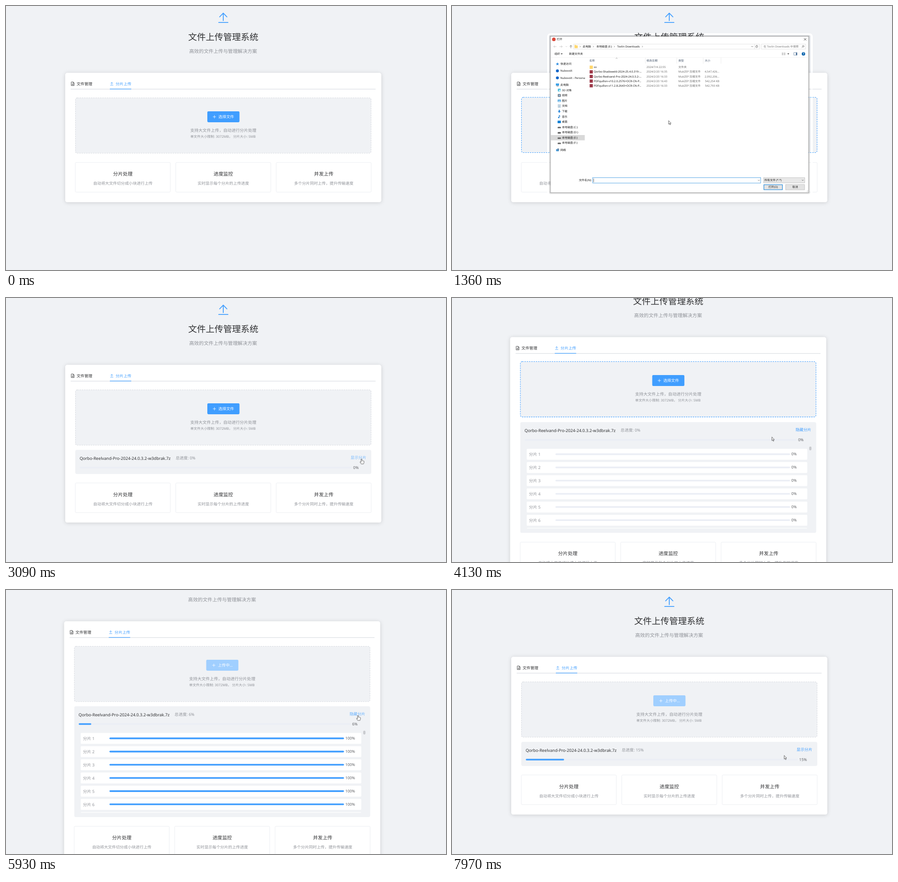
These frames come from a looping animation (966 by 579 pixels, 8 s). An HTML page:

```html
<!DOCTYPE html>
<html lang="zh-CN">
<head>
<meta charset="utf-8">
<title>文件上传管理系统</title>
<style>
html, body { margin: 0; width: 100%; height: 100%; overflow: hidden; background: #f0f2f5; }
svg { display: block; width: 966px; height: 579px; }
text {
  font-family: "Noto Sans", "Noto Sans CJK SC", "Noto Sans CJK", sans-serif;
  dominant-baseline: central; text-rendering: geometricPrecision; white-space: pre;
}
.mid { text-anchor: middle; }
.end { text-anchor: end; }
.dark { fill: #303133; }
.soft { fill: #909399; }
.blue { fill: #409eff; }
.line { fill: none; stroke-linecap: round; stroke-linejoin: round; }

/* one loop is 8 s, so 1% is 80 ms */
#page { animation: scroll 8s infinite linear; }
#card { filter: drop-shadow(0 1px 4px rgba(0,0,0,.15)); animation: card 8s infinite step-end; }
#features { animation: features 8s infinite step-end; }
#zone { animation: hot 8s infinite linear; }
#button { animation: button 8s infinite step-end; }
#idle { animation: idle 8s infinite step-end; }
#busy { animation: busy 8s infinite step-end; }
#file { animation: file 8s infinite step-end; }
#panel { animation: panel 8s infinite step-end; }
#list, #hide { animation: open 8s infinite step-end; }
#show { animation: shut 8s infinite step-end; }
#links { animation: link 8s infinite linear; }
#total { animation: total 8s infinite linear; }
.chunk { animation: grow 8s linear calc(4567ms + var(--i) * 55ms) infinite backwards; }
#dialog, #halo { animation: dialog 8s infinite linear; }
#halo { mix-blend-mode: color-dodge; }
#row { animation: row 8s infinite step-end; }
#cursor { animation: move 8s infinite ease-in-out; }
#arrow { animation: arrow 8s infinite step-end; }
#hand { animation: hand 8s infinite step-end; }

@keyframes scroll {
  0%, 45.62% { transform: none; }
  45.625% { transform: translate(-2.4px, 0); }
  49.97% { transform: translate(-2.4px, 0); animation-timing-function: cubic-bezier(.33,.67,.67,1); }
  53.125%, 78.12% { transform: translate(-2.4px, -78px); }
  78.125%, 100% { transform: none; }
}
@keyframes card {
  0% { height: 283.6px; } 27.625% { height: 346px; }
  45.625% { height: 536px; } 78.125% { height: 346px; }
}
@keyframes features {
  0% { transform: none; } 27.625% { transform: translateY(62.5px); }
  45.625% { transform: translateY(253px); } 78.125% { transform: translateY(62.5px); }
}
@keyframes hot {
  0%, 4.8%, 30%, 31.2%, 38%, 47%, 54%, 88.2%, 93.5%, 100% { color: #d6d9df; transform: none; }
  7%, 28.2%, 33.5%, 35.5%, 49%, 52.6%, 90%, 91.5% { color: #409eff; transform: translateY(-1.2px); }
}
@keyframes button {
  0% { fill: #409eff; } 8% { fill: #79bbff; } 28.2% { fill: #409eff; } 56.6% { fill: #a0cfff; }
}
@keyframes idle { 0% { visibility: visible; } 56.6% { visibility: hidden; } }
@keyframes busy { 0% { visibility: hidden; } 56.6% { visibility: visible; } }
@keyframes file { 0% { visibility: hidden; } 27.625% { visibility: visible; } }
@keyframes panel { 0% { height: 53px; } 45.625% { height: 243px; } 78.125% { height: 53px; } }
@keyframes open {
  0% { visibility: hidden; } 45.625% { visibility: visible; } 78.125% { visibility: hidden; }
}
@keyframes shut {
  0% { visibility: hidden; } 27.625% { visibility: visible; }
  45.625% { visibility: hidden; } 78.125% { visibility: visible; }
}
@keyframes link {
  0%, 37.4%, 48%, 73.4%, 78.2%, 100% { fill: #409eff; }
  38.2%, 46.4%, 74.6%, 78.1% { fill: #79bbff; }
}
@keyframes total {
  0%, 57.1% { width: 0; } 61.6% { width: 3.2px; } 66.6% { width: 12px; }
  86.1% { width: 52.5px; } 99.6% { width: 84px; } 100% { width: 85px; }
}
@keyframes grow {
  0% { width: 0; animation-timing-function: ease; }
  7.5%, 30% { width: 515px; }
  30.1%, 100% { width: 0; }
}
@keyframes dialog {
  0%, 13.2% { opacity: 0; } 14.8%, 27.6% { opacity: 1; } 28.6%, 100% { opacity: 0; }
}
@keyframes row { 0% { visibility: hidden; } 20.8% { visibility: visible; } 29% { visibility: hidden; } }
@keyframes move {
  0% { transform: translate(491px, 590px); }
  .5% { transform: translate(490px, 551px); }
  8.75%, 17% { transform: translate(475.2px, 251px); }
  21% { transform: translate(343px, 152px); }
  22.5% { transform: translate(356px, 152px); }
  24.5%, 28.6% { transform: translate(350px, 152px); }
  37.6%, 38.7% { transform: translate(780.5px, 352.5px); }
  40.6% { transform: translate(784px, 353px); }
  43.1%, 46.1% { transform: translate(781px, 352.5px); }
  48.75%, 68.1% { transform: translate(702px, 304.5px); }
  74.4%, 88.1% { transform: translate(773px, 274.5px); }
  93% { transform: translate(757px, 332px); }
  97.6% { transform: translate(729px, 353px); }
  99.6%, 100% { transform: translate(729px, 362.5px); }
}
@keyframes arrow {
  0% { visibility: visible; } 8% { visibility: hidden; } 13.5% { visibility: visible; }
  37.5% { visibility: hidden; } 46.3% { visibility: visible; }
  73.7% { visibility: hidden; } 88.2% { visibility: visible; }
}
@keyframes hand {
  0% { visibility: hidden; } 8% { visibility: visible; } 13.5% { visibility: hidden; }
  37.5% { visibility: visible; } 46.3% { visibility: hidden; }
  73.7% { visibility: visible; } 88.2% { visibility: hidden; }
}
</style>
</head>
<body>
<svg viewBox="0 0 966 579" xmlns="http://www.w3.org/2000/svg">
  <defs>
    <clipPath id="listBox"><rect x="160" y="386" width="640" height="180.3"/></clipPath>
    <clipPath id="sideBox"><rect x="217" y="114" width="74.8" height="252"/></clipPath>
    <path id="plus" class="line" stroke="#fff" stroke-width=".8" d="M-3 0H3M0-3V3"/>
  </defs>
  <rect width="966" height="579" fill="#f0f2f5"/>

  <g id="page">
    <path class="line" stroke="#409eff" stroke-width="1.8" d="M467 36.2H487.3M477 32V15.7M469 23.8L477 15.7L485 23.8"/>
    <text class="mid dark" x="477" y="67" font-size="19.3">文件上传管理系统</text>
    <text class="mid soft" x="476.7" y="99.5" font-size="10.65">高效的文件上传与管理解决方案</text>

    <rect id="card" x="130" y="146.6" width="694" height="283.6" rx="4.5" fill="#fff"/>
    <path stroke="#dcdfe4" stroke-width="1.1" d="M142 182.4H811.5"/>
    <path stroke="#409eff" stroke-width="1.3" d="M228 182.2H275"/>
    <path class="line" stroke="#303133" stroke-width=".8" d="M143.6 166.7H147.6L149.6 168.7V174.6H143.6ZM147.4 166.9V169H149.4M145 171H148.2M145 172.8H148.2"/>
    <text class="dark" x="155" y="171" font-size="8.6">文件管理</text>
    <path class="line" stroke="#409eff" stroke-width=".8" d="M229.3 173.7H235.2M232.2 172V167.5M229.8 169.8L232.2 167.4L234.6 169.8"/>
    <text class="blue" x="240.7" y="171" font-size="8.6">分片上传</text>

    <g id="zone">
      <rect x="152.5" y="201.5" width="649" height="121.3" rx="4" fill="#f0f2f5" stroke="currentColor" stroke-width="1.05" stroke-dasharray="3 2"/>
      <rect id="button" x="442" y="231" width="70.6" height="24" rx="2.4"/>
      <g id="idle">
        <use href="#plus" x="457.6" y="243"/>
        <text x="466.3" y="242.7" font-size="8.6" fill="#fff">选择文件</text>
      </g>
      <g id="busy">
        <use href="#plus" x="458.6" y="243"/>
        <text x="467.6" y="242.7" font-size="8.6" fill="#fff">上传中...</text>
      </g>
      <text class="soft mid" x="477" y="272" font-size="9.08">支持大文件上传，自动进行分片处理</text>
      <text class="soft" x="404.7" y="287" font-size="7.45">单文件大小限制: 3072MB， 分片大小: 5MB</text>
    </g>

    <g id="file">
      <rect id="panel" x="152" y="333" width="650" height="53" rx="4" fill="#f0f2f5"/>
      <text class="dark" x="161.7" y="351" font-size="9.15">Qorbo-Reelvand-Pro-2024-24.0.3.2-w3dbrak.7z</text>
      <text id="sum" class="soft" x="372.5" y="350.7" font-size="8.8"></text>
      <rect x="162" y="370.2" width="597" height="3.6" rx="1.8" fill="#ebeef5"/>
      <rect id="total" x="162" y="370.2" height="3.6" rx="1.8" fill="#409eff"/>
      <text id="pct" x="762.3" y="372.5" font-size="8.5" fill="#606266"></text>
    </g>
    <g id="links" class="end" font-size="8.6">
      <text id="show" x="791" y="350">显示分片</text>
      <text id="hide" x="791" y="350">隐藏分片</text>
    </g>
    <g id="list">
      <g id="chunks" clip-path="url(#listBox)"></g>
      <rect x="786.6" y="386.4" width="5" height="8.6" rx="2.4" fill="#c9cbcf"/>
    </g>
    <g id="features"></g>
  </g>

  <rect id="halo" x="211" y="62" width="579" height="350" rx="5" fill="none" stroke="#121212" stroke-width="4"/>
  <g id="dialog">
    <rect x="214.5" y="65" width="570" height="346" rx="2" fill="none" stroke="#000" stroke-opacity=".1" stroke-width="3"/>
    <rect x="216" y="66.4" width="567" height="343" fill="#fff" stroke="#555" stroke-width=".6"/>
    <circle cx="223.6" cy="73.2" r="3.9" fill="#db4a3c"/>
    <path class="line" stroke="#222" stroke-width=".8" d="M773 70.8L777.6 75.4M777.6 70.8L773 75.4"/>
    <g class="line" stroke-width=".7">
      <path stroke="#b5b5b5" d="M229 89H223.4M225.4 87L223.4 89L225.4 91M236.4 89H242M240 87L242 89L240 91M249.8 88.4L251 89.6L252.2 88.4"/>
      <path stroke="#444" d="M261 92V86.4M258.8 88.6L261 86.4L263.2 88.6M657.4 88.2L659 89.8L660.6 88.2M670.9 88A2.2 2.2 0 1 1 669 86.9M669 85.8L670.4 87L669 88.2"/>
      <path stroke="#666" d="M280.8 87.6L282.2 89L280.8 90.4M309.8 87.6L311.2 89L309.8 90.4M355.8 87.6L357.2 89L355.8 90.4M417.4 87.6L418.8 89L417.4 90.4M768 91.4L769.6 89.8"/>
      <circle cx="771" cy="88.3" r="1.8" stroke="#555"/>
      <path stroke="#d9d9d9" d="M267.5 83.5H675.5V94.5H267.5ZM664.5 84V94M679.5 83.5H776.5V94.5H679.5Z"/>
      <path stroke="#ececec" d="M217 113H782.5"/>
      <path stroke="#e5e5e5" d="M424.5 114V126M493.5 114V126M551.5 114V126M590.5 114V126"/>
      <path stroke="#777" d="M359.8 115.2L361.4 113.8L363 115.2M724.5 103H727M724.5 105H727M724.5 107H727M729 103H731.5M729 105H731.5M729 107H731.5"/>
      <path stroke="#50739a" d="M750.8 102.2H757.6V107.8H750.8Z"/>
    </g>
    <path fill="#50739a" d="M755 102H757.6V108H755Z"/>
    <path fill="#333" d="M238.8 104H243L240.9 106.3ZM736.2 104H740.4L738.3 106.3Z"/>
    <circle cx="771.6" cy="105" r="3.8" fill="#0a64ad"/>
    <path fill="#ffd76e" d="M269 85.4H272L273 86.4H276V92.6H269Z"/>
    <rect id="row" x="297" y="149.4" width="293" height="10.1" fill="#e5f3ff"/>
    <rect x="217" y="283" width="74.5" height="11.6" fill="#d9d9d9"/>
    <rect x="308.8" y="376.6" width="369" height="11.6" fill="#fff" stroke="#0078d7" stroke-width=".65"/>
    <path stroke="#222" stroke-width=".7" d="M311 378.5V386.5"/>
    <rect x="684" y="376.5" width="90.3" height="11.5" fill="#e8e8e8" stroke="#a8a8a8" stroke-width=".6"/>
    <path class="line" stroke="#444" stroke-width=".7" d="M672 381.6L673.6 383.2L675.2 381.6M768.4 381.4L770 383L771.6 381.4"/>
    <rect x="684.7" y="391.9" width="40.7" height="11" fill="#e3e3e3" stroke="#0078d7" stroke-width="1"/>
    <rect x="732.5" y="391.7" width="41.6" height="11.4" fill="#e3e3e3" stroke="#a8a8a8" stroke-width=".6"/>
    <path stroke="#b8b8b8" stroke-width=".8" d="M778.5 407.5L781.5 404.5M780.3 407.7L781.7 406.3"/>
    <g id="labels" font-size="6.05" fill="#1a1a1a"></g>
    <g id="side" font-size="6.05" fill="#1a1a1a" clip-path="url(#sideBox)"></g>
    <g id="rows" font-size="6.05"></g>
  </g>

  <g id="cursor">
    <path id="arrow" fill="#fff" stroke="#222" stroke-width=".7" stroke-linejoin="round" d="M.3 .4V8.2L2.1 6.6L3.4 9.6L4.7 9L3.4 6.1H5.8Z"/>
    <path id="hand" fill="#fff" stroke="#222" stroke-width=".7" stroke-linejoin="round" d="M-.9 .9Q0-.4 .9 .9V4.2Q2 3.5 2.6 4.5Q3.7 4 4.2 5Q5.4 4.7 5.5 6V8.4L4.3 11.4H-.6L-3.2 7.6Q-3.2 6.2-1.9 6.7L-.9 7.6Z"/>
  </g>
</svg>

<script>
const $ = id => document.getElementById(id);
const label = (x, y, str, attrs = '') => `<text x="${x}" y="${y}" ${attrs}>${str}</text>`;
const box = (x, y, w, h, fill, attrs = '') =>
  `<rect x="${x}" y="${y}" width="${w}" height="${h}" fill="${fill}" ${attrs}/>`;

$('features').innerHTML = [
  ['分片处理', '自动将大文件切分成小块进行上传'],
  ['进度监控', '实时显示每个分片的上传进度'],
  ['并发上传', '多个分片同时上传，提升传输速度']
].map(([head, body], i) => {
  const x = 152.2 + i * 220.5, mid = x + 104.4;
  return box(x, 343.2, 208.6, 65, '#fff', 'rx="2" stroke="#e2e5eb" stroke-width=".65"') +
    label(mid, 369, head, 'class="mid dark" font-size="10.65"') +
    label(mid, 389, body, 'class="mid soft" font-size="8.68"');
}).join('');

$('chunks').innerHTML = Array.from({ length: 7 }, (_, i) => {
  const y = 391.5 + i * 28.93, mid = y + 12;
  return box(166.4, y, 616, 24, '#fff', 'rx="2"') +
    label(171.4, mid, '分片 ' + (i + 1), 'class="soft" font-size="9"') +
    box(229.5, mid - 1.9, 515, 3.6, '#ebeef5', 'rx="1.8"') +
    box(229.5, mid - 1.9, 0, 3.6, '#409eff', `rx="1.8" class="chunk" style="--i:${i}"`) +
    label(747.4, mid, '0%', 'class="done" font-size="8.4" fill="#606266"');
}).join('');

$('labels').innerHTML = [
  [230, 73.2, '打开'], [287, 89, '此电脑'], [317, 89, '本地磁盘 (E:)'], [362.5, 89, 'Tovlin Downloads'],
  [684, 89, '在 Tovlin Downloads 中搜索', 'fill="#777"'], [225, 105, '组织'], [257, 105, '新建文件夹'],
  [771.6, 105, '?', 'class="mid" fill="#fff" font-weight="700"'],
  [301.5, 119.7, '名称', 'fill="#44546a"'], [427, 119.7, '修改日期', 'fill="#44546a"'],
  [497, 119.7, '类型', 'fill="#44546a"'], [555, 119.7, '大小', 'fill="#44546a"'],
  [306.5, 382.2, '文件名(N):', 'class="end"'], [686, 382.2, '所有文件 (*.*)'],
  [705, 397.4, '打开(O)', 'class="mid"'], [753.4, 397.4, '取消', 'class="mid"']
].map(a => label(...a)).join('');

const disk = y => box(232, y - .2, 7, 2.6, '#555', 'rx=".6"') + box(232.6, y - 1.4, 5.8, 1.2, '#bbb');
const dot = y => `<circle cx="231.4" cy="${y}" r="3.2" fill="#0a64c8"/>`;
const icons = {
  star: y => `<path fill="#2f8de0" transform="translate(231.5 ${y})" d="M0-3.6L1-1.1L3.6-1L1.6 .6L2.3 3.2L0 1.8L-2.3 3.2L-1.6 .6L-3.6-1L-1-1.1Z"/>`,
  pc: y => box(228, y - 3, 7, 4.6, '#3aa0e6') + box(229.5, y + 2.2, 4.5, 1, '#567'),
  cube: y => box(232.5, y - 3, 6, 6, '#35b4d8', 'rx="1"') + box(234.6, y - 1, 3.4, 3.6, '#c4edf7'),
  film: y => box(232.5, y - 3, 6, 6, '#555d66') + box(234, y - 2, 3, 4, '#9ec6e8'),
  photo: y => box(232, y - 2.4, 7, 5, '#4aa3df') + box(233, y, 5, 1.6, '#d8eefa'),
  doc: y => box(233, y - 3.2, 5, 6.4, '#eef4f8', 'stroke="#6a8ba5" stroke-width=".6"') + box(234.2, y - 1, 2.6, 2.4, '#8db3cf'),
  down: y => `<path fill="#2a86d8" transform="translate(235.5 ${y})" d="M-1.3-3.2H1.3V0H3.3L0 3.4L-3.3 0H-1.3Z"/>`,
  note: y => `<path fill="none" stroke="#1f7fd0" stroke-width="1.1" transform="translate(235.5 ${y})" d="M-.2 2V-3.2Q.4-1.4 2.4-.6"/><circle cx="234.4" cy="${y + 2}" r="1.5" fill="#1f7fd0"/>`,
  desk: y => box(231.8, y - 2.6, 7.2, 5.4, '#1380d4', 'rx=".4"'),
  net: y => box(228.6, y - 1.6, 6.2, 4.4, '#3a94d6', 'rx="1"') + `<circle cx="233" cy="${y - 1}" r="2.3" fill="#6d8fb0"/>`,
  dot, disk
};
const branch = (x, y0, step, items) => items.map(([icon, str], i) => {
  const y = +(y0 + i * step).toFixed(2);
  return icons[icon](y) + label(x, y, str);
}).join('');
$('side').innerHTML =
  branch(238, 127, 15.3, [['star', '快速访问'], ['dot', 'Nubovolt'], ['dot', 'Nubovolt - Personal'], ['pc', '此电脑']]) +
  branch(241.3, 184.6, 11.58, [
    ['cube', '3D 对象'], ['film', '视频'], ['photo', '图片'], ['doc', '文档'], ['down', '下载'], ['note', '音乐'],
    ['desk', '桌面'], ['disk', '本地磁盘 (C:)'], ['disk', '本地磁盘 (D:)'], ['disk', '本地磁盘 (E:)'], ['disk', '本地磁盘 (F:)']
  ]) +
  branch(238, 315.6, 0, [['net', '网络']]);

$('rows').innerHTML = [
  ['xx', '2024/7/4 22:55', ''],
  ['Qorbo-Shadoweld-2024-25.4.0.319-...', '2024/2/20 16:35', '4,547,426...'],
  ['Qorbo-Reelvand-Pro-2024-24.0.3.2-...', '2024/2/20 16:33', '2,092,206...'],
  ['PDFquillon-v10.2.0.2576+OCR-CN-P...', '2024/2/20 16:43', '542,254 KB'],
  ['PDFquillon-v11.2.8.2643+OCR-CN-P...', '2024/2/20 16:33', '542,793 KB']
].map(([name, date, size], i) => {
  const y = 134.3 + i * 10.13, grey = 'fill="#6d6d6d"';
  return box(302.2, y - 3.6, 7, 7.2, i ? '#9c3848' : '#ffd76e') +
    label(311.3, y, name, 'fill="#1a1a1a"') + label(427, y, date, grey) +
    label(497, y, i ? 'MukZEP 压缩文件' : '文件夹', grey) + label(587, y, size, grey + ' class="end"');
}).join('');

const done = [...document.querySelectorAll('.done')];
const setText = (el, str) => { if (el.textContent !== str) el.textContent = str; };
let start;
function tick(now) {
  start ??= now;
  const t = (now - start) % 8000 - 4567;
  const pct = Math.floor(Math.max(0, t * .00465)) + '%';
  setText($('sum'), '总进度: ' + pct);
  setText($('pct'), pct);
  done.forEach((el, i) => setText(el, t >= i * 55 ? '100%' : '0%'));
  requestAnimationFrame(tick);
}
requestAnimationFrame(tick);
</script>
</body>
</html>
```
